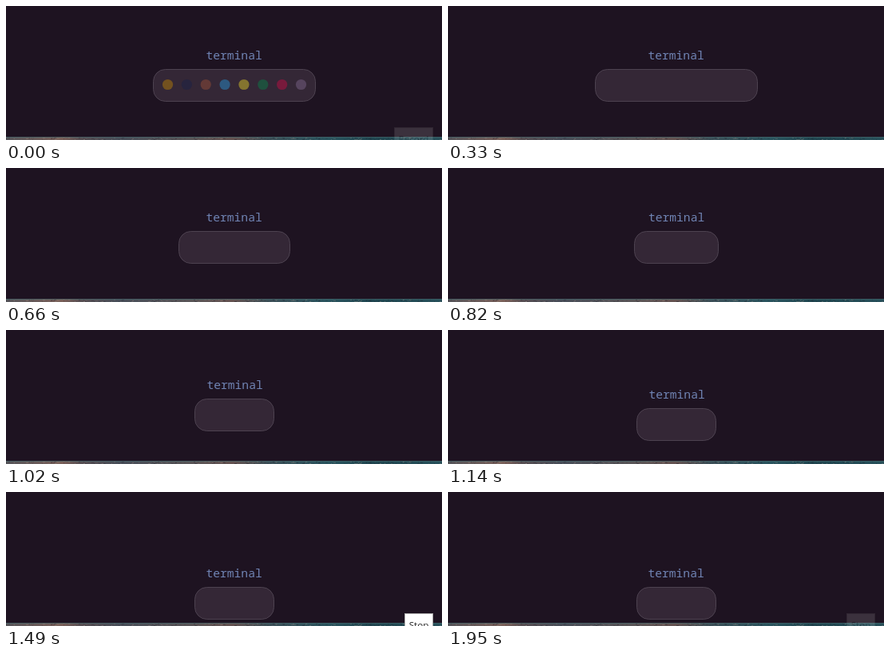
An HTML page that plays this animation: 546x168 px, repeating every 1.97 s.

```html
<!DOCTYPE html>
<html lang="en">
<head>
<meta charset="utf-8">
<title>Terminal dock</title>
<style>
  html, body { margin: 0; width: 100%; height: 100%; overflow: hidden; background: #1e1321; }
  svg { display: block; width: 546px; height: 168px; }
  .label { font: 14.667px "Noto Sans Mono", "DejaVu Sans Mono", monospace; fill: #7084b4; }
  .button text { font: 11.6px "Open Sans", "Noto Sans", sans-serif; fill: #222; text-anchor: middle; }
  .button rect { fill: #fff; stroke: #aaa; }
</style>
</head>
<body>
<svg viewBox="0 0 546 168" xmlns="http://www.w3.org/2000/svg">
  <defs>
    <linearGradient id="ground">
      <stop offset="0" stop-color="#55555a"/>
      <stop offset=".13" stop-color="#7a6059"/>
      <stop offset=".17" stop-color="#574f53"/>
      <stop offset=".26" stop-color="#474e59"/>
      <stop offset=".42" stop-color="#595658"/>
      <stop offset=".52" stop-color="#655351"/>
      <stop offset=".6" stop-color="#3c5058"/>
      <stop offset=".74" stop-color="#29555f"/>
      <stop offset=".84" stop-color="#1f4650"/>
      <stop offset="1" stop-color="#27515b"/>
    </linearGradient>
  </defs>
  <rect width="546" height="168" fill="#1e1321"/>
  <rect y="164" width="546" height="4" fill="url(#ground)"/>
  <g id="specks"></g>
  <rect y="164" width="546" height="1" fill="#45666b" opacity=".65"/>
  <text id="label" class="label">terminal</text>
  <rect id="pill" height="40" rx="15" fill="#342736" stroke="#4d4250"/>
  <g id="dots"></g>
  <g id="record" class="button">
    <rect x="486.5" y="152.5" width="48" height="24"/>
    <text x="510.5" y="171">Record</text>
  </g>
  <g id="stop" class="button">
    <rect x="499.5" y="152.5" width="35" height="24"/>
    <text x="517" y="171">Stop</text>
  </g>
</svg>
<script>
const LOOP = 1970;
const DOT_COLORS = ['#75521f', '#27243f', '#643a36', '#2d5b82',
                    '#86762f', '#1f513f', '#7a1a3d', '#57455f'];
const el = id => document.getElementById(id);
const clamp = v => Math.min(1, Math.max(0, v));
const ramp = (t, start, duration) => clamp((t - start) / duration);

function add(parent, name, attrs) {
  const node = document.createElementNS('http://www.w3.org/2000/svg', name);
  setAttrs(node, attrs);
  parent.appendChild(node);
}

function setAttrs(node, attrs) {
  for (const key in attrs) node.setAttribute(key, attrs[key]);
}

// Cubic Bézier ease-in-out with control points (.42, 0) and (.58, 1).
function easeInOut(x) {
  let low = 0, high = 1;
  for (let i = 0; i < 20; i++) {
    const s = (low + high) / 2, r = 1 - s;
    if (3 * r * r * s * .42 + 3 * r * s * s * .58 + s * s * s < x) low = s;
    else high = s;
  }
  return low * low * (3 - 2 * low);
}

function buildScene() {
  DOT_COLORS.forEach((fill, i) =>
    add(el('dots'), 'circle', { cx: 202.5 + i * 23.86, cy: 98.5, r: 6.6, fill }));

  let seed = 11;
  const random = () => (seed = seed * 16807 % 2147483647) / 2147483647;
  for (let i = 0; i < 220; i++) {
    add(el('specks'), 'rect', {
      x: Math.floor(random() * 546), y: 165 + Math.floor(random() * 3),
      width: 1 + Math.floor(random() * 3), height: 1,
      fill: random() < .6 ? '#1e1c28' : '#a08c82', opacity: random() * .4
    });
  }
}

function render(t) {
  const inset = Math.round(52 * easeInOut(ramp(t, 320, 600)));
  const drop = Math.round(40 * easeInOut(ramp(t, 848, 610)));
  const nudge = t < 700 || t > 1455 ? 0 : t < 850 ? .5 : 1;

  setAttrs(el('pill'), { x: 184.5 + inset, y: 79.5 + drop, width: 203 - 2 * inset });
  setAttrs(el('label'), { x: 250.4 + nudge, y: 67 + drop });
  setAttrs(el('dots'), { opacity: 1 - ramp(t, 0, 50) });
  setAttrs(el('record'), { opacity: .13 * (1 - ramp(t, 0, 40)) });
  setAttrs(el('stop'), { opacity: ramp(t, 1270, 150) * (1 - ramp(t, 1818, 152)) });
}

function frame() {
  render(performance.now() % LOOP);
  requestAnimationFrame(frame);
}

buildScene();
frame();
</script>
</body>
</html>
```
